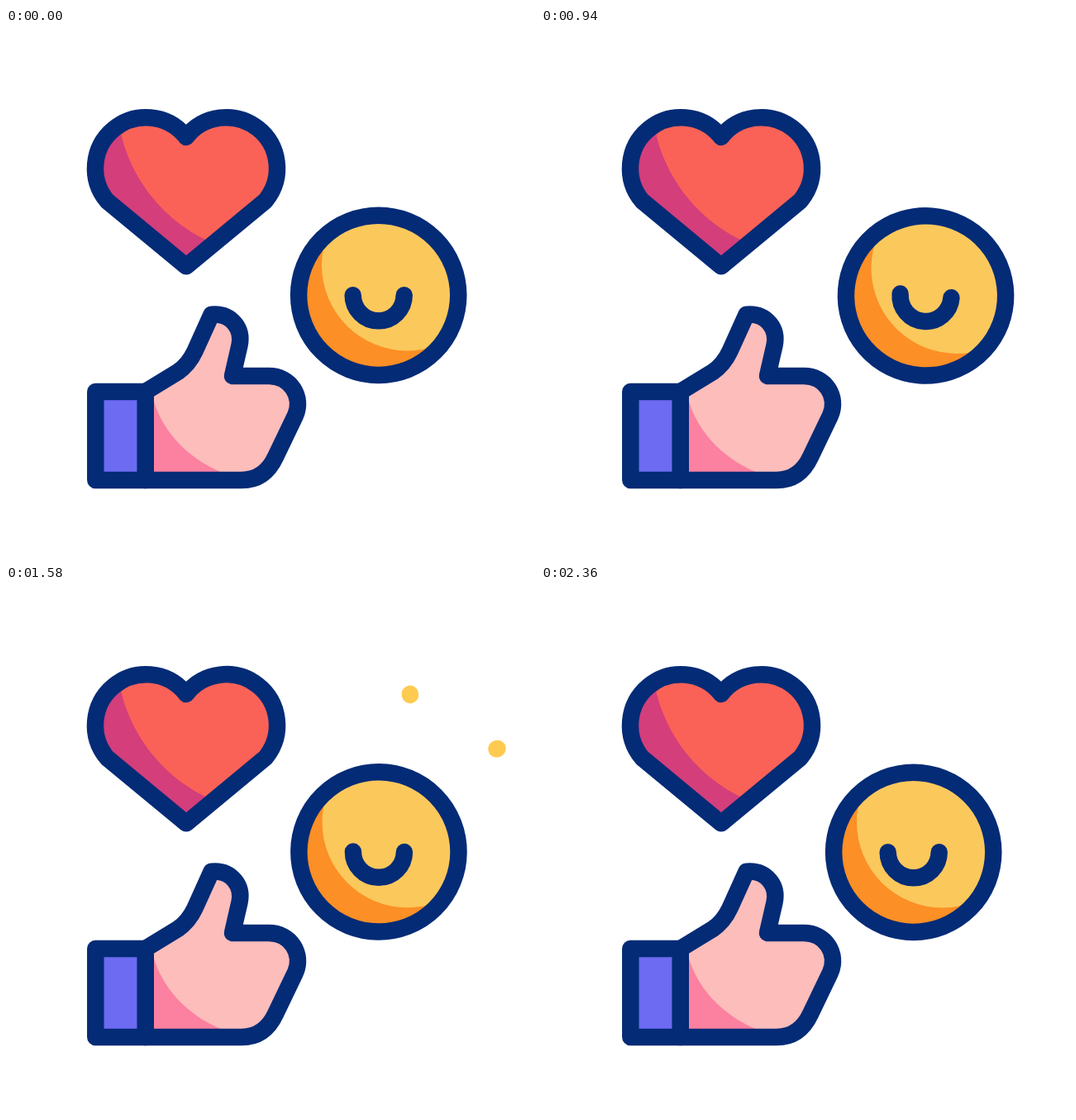
Write an HTML page with a canvas that moves like this. It is 640 px wide and 640 px high and loops after 2400 ms.

```html
<!DOCTYPE html>
<html lang="en">
<head>
<meta charset="utf-8">
<title>Reactions</title>
<style>
  html, body { margin: 0; width: 100%; height: 100%; overflow: hidden; background: #fff; }
  canvas { display: block; width: 640px; height: 640px; }
</style>
</head>
<body>
<canvas id="stage" width="640" height="640"></canvas>
<script>
const ctx = document.getElementById('stage').getContext('2d');
const LOOP = 2400;
const STROKE = 20.5;
const NAVY = '#042b76';
const SPARK = '#ffca50';
const rad = deg => deg * Math.PI / 180;

const ease = x => {
  x = Math.min(1, Math.max(0, x));
  return x * x * (3 - 2 * x);
};

// Each icon swings out over [a, b], rests until c and is home again at d.
// p is the way out, bow is the bend of the outward path.
function swing(t, a, b, c, d) {
  const out = ease((t - a) / (b - a));
  return { p: out - ease((t - c) / (d - c)), bow: Math.sin(Math.PI * out) };
}

function posed(cx, cy, dx, dy, deg, scale, draw) {
  ctx.save();
  ctx.translate(cx + dx, cy + dy);
  ctx.rotate(rad(deg));
  ctx.scale(scale, scale);
  ctx.translate(-cx, -cy);
  ctx.lineWidth = STROKE / scale;
  draw();
  ctx.restore();
}

function shaded(shape, dark, light, lightArea) {
  ctx.save();
  ctx.clip(shape);
  ctx.fillStyle = dark;
  ctx.fill(shape);
  ctx.fillStyle = light;
  ctx.fill(lightArea);
  ctx.restore();
  ctx.strokeStyle = NAVY;
  ctx.stroke(shape);
}

// A short stroke running along the line from (x1, y1) to (x2, y2).
function spark(t, start, length, x1, y1, x2, y2) {
  const u = (t - start) / length;
  if (u <= 0 || u >= 1) return;
  const head = ease(u / 0.7), tail = ease((u - 0.3) / 0.7);
  const at = k => [x1 + (x2 - x1) * k, y1 + (y2 - y1) * k];
  ctx.strokeStyle = SPARK;
  ctx.lineWidth = STROKE;
  ctx.beginPath();
  ctx.moveTo(...at(tail));
  ctx.lineTo(...at(head + 0.001));
  ctx.stroke();
}

const heart = new Path2D();
heart.arc(169.5, 169.7, 61.5, rad(140), rad(322.1));
heart.arc(266.5, 169.7, 61.5, rad(217.9), rad(400));
heart.lineTo(218, 288.3);
heart.closePath();
const heartLight = new Path2D('M136 110C143 170 185 235 255 262H400V50H136Z');

const face = new Path2D();
face.arc(450.7, 323.3, 96.6, 0, rad(360));
const faceLight = new Path2D();
faceLight.arc(485.5, 287, 103.5, 0, rad(360));
const mouth = new Path2D();
mouth.arc(450.7, 323.3, 31, 0, rad(180));

const cuff = new Path2D('M108.3 440H168.7V547H108.3Z');
const hand = new Path2D('M168.7 440L208 416Q221 407 228.5 391L248.5 346.8L253 346.5' +
  'C272 346.5 287 363 282.5 384L274 421H318C344 421 360 446 350 469L326 519' +
  'Q313 547 285 547H168.7Z');
const handLight = new Path2D('M176 440C185 485 218 520 262 538H400V320H176Z');

function drawThumb(t) {
  const { p, bow } = swing(t, 80, 580, 650, 900);
  spark(t, 500, 350, 198.5, 338, 170.5, 316);
  spark(t, 500, 350, 304, 305.7, 282, 329.7);
  posed(230.5, 446.5, 0, -8 * bow, -6.95 * p, 1, () => {
    shaded(hand, '#fc80a0', '#fcbdbb', handLight);
    shaded(cuff, '#6c6bf2', '#6c6bf2', cuff);
  });
}

function drawFace(t) {
  const { p, bow } = swing(t, 820, 1320, 1340, 1600);
  spark(t, 1240, 370, 481, 101, 489, 133);
  spark(t, 1240, 370, 565, 206, 594.5, 198);
  posed(450.7, 323.3, 16 * p + 28 * bow, -29 * p + 11 * bow, 30 * p, 1, () => {
    shaded(face, '#fc8f25', '#fbc85c', faceLight);
    ctx.stroke(mouth);
  });
}

function drawHeart(t) {
  const { p } = swing(t, 1570, 2060, 2080, 2340);
  spark(t, 1915, 375, 108.5, 83, 88.5, 66.5);
  spark(t, 1915, 375, 311, 37.5, 292, 63.5);
  posed(218, 198.5, 16.3 * p, -17 * p, -8 * p, 1 + 0.11 * p, () => {
    shaded(heart, '#d33e7b', '#fa6257', heartLight);
  });
}

function frame() {
  const t = performance.now() % LOOP;
  ctx.fillStyle = '#fff';
  ctx.fillRect(0, 0, 640, 640);
  ctx.lineCap = ctx.lineJoin = 'round';
  drawHeart(t);
  drawFace(t);
  drawThumb(t);
  requestAnimationFrame(frame);
}
frame();
</script>
</body>
</html>
```
